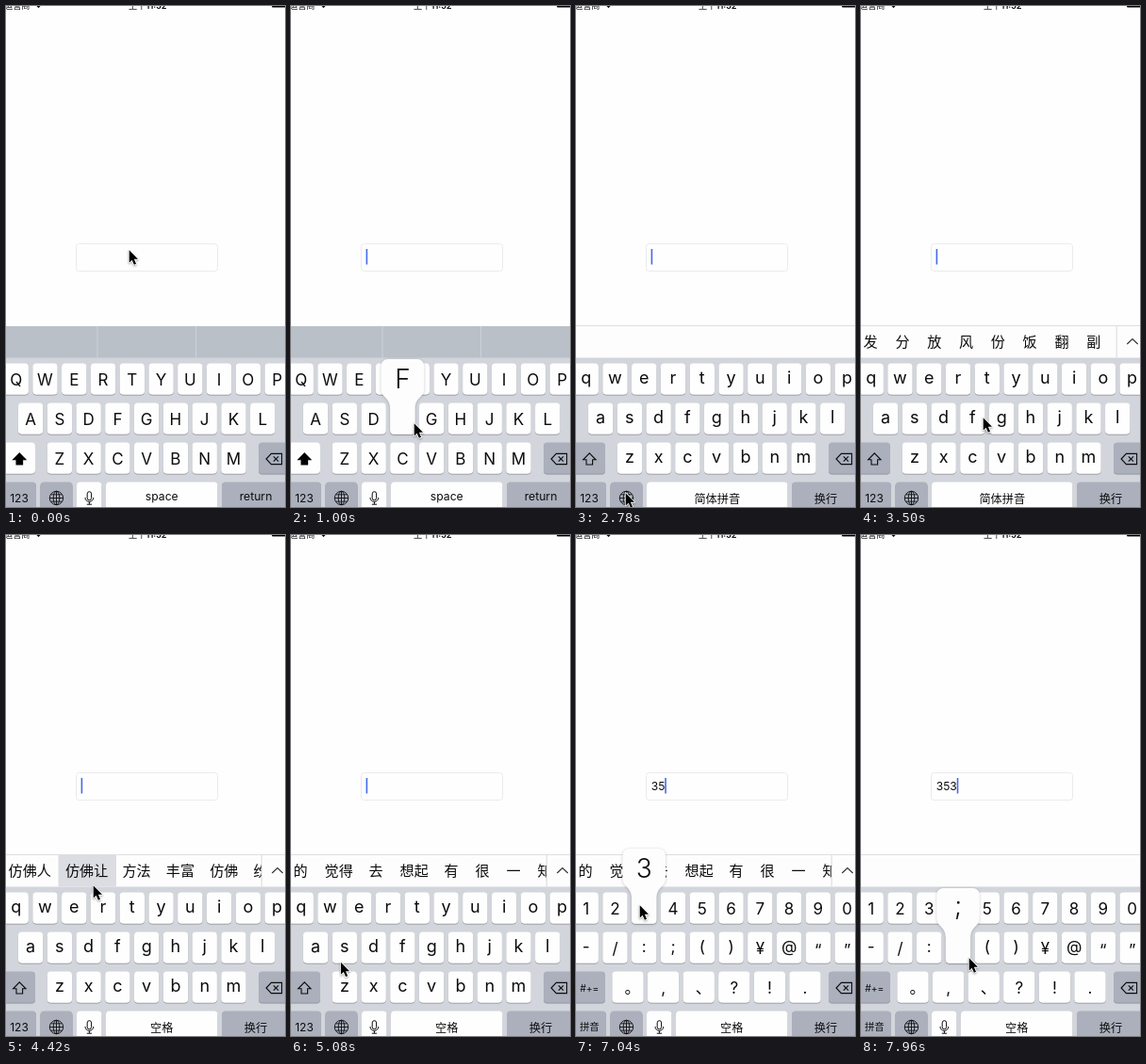
An HTML page with a canvas that plays this animation: 296x532 px, repeating every 7.99 s.

```html
<!DOCTYPE html>
<html lang="zh-CN">
<head>
<meta charset="utf-8">
<title>Keyboard input</title>
<style>
html, body { margin: 0; width: 100%; height: 100%; overflow: hidden; background: #fefefe; }
canvas { display: block; width: 296px; height: 532px; }
</style>
</head>
<body>
<canvas id="stage"></canvas>
<script>
const W = 296, H = 532, LOOP = 7990;
const LATIN = 'Inter, "Noto Sans CJK SC", "Noto Sans CJK", sans-serif';
const HAN = '"Noto Sans CJK SC", "Noto Sans CJK", sans-serif';
const INK = '#0c0c0e', GREY = '#abb0bc', WHITE = '#fefefe';
const PITCH = 30.77, KEY_W = 26.4, KEY_H = 33.4, FIRST = 10.7;
const BAR_TOP = 340, BAR_END = 373.4;
const rowTop = i => 379.4 + 42 * i;

// When the layouts change and how long a key stays down
const LOWER = 1090, PINYIN = 2700, NAMED = 3680, DIGITS = 5840, HOLD = 90;

const canvas = document.getElementById('stage');
const ctx = canvas.getContext('2d');
const dpr = window.devicePixelRatio || 1;
canvas.width = W * dpr;
canvas.height = H * dpr;

// Each row of keys: characters, indent in keys, pitch, key width
const row = (chars, indent, pitch = PITCH, w = KEY_W) => ({ chars: [...chars], x: FIRST + indent * PITCH, pitch, w });
const letters = [row('qwertyuiop', 0), row('asdfghjkl', 0.5), row('zxcvbnm', 1.5)];
const symbols = [row('1234567890', 0), row('-/:;()¥@“”', 0), row('。,、?!.', 1.44, 37.6, 33.4)];

const taps = [
  [1000, 'F'], [3340, 'f'], [3530, 'f'], [3740, 'r'], [6310, '3'],
  [6720, '5'], [7040, '3'], [7690, ';'], [7940, ';']
];

// Pointer moves: start, end, x, y
const moves = [
  [20, 330, 130, 443], [LOWER, 1200, 130, 400], [1370, 1900, 22, 399], [2040, 2520, 52, 517],
  [3140, 3340, 129, 437], [3610, 3740, 102, 406], [3990, 4210, 92, 372], [4770, 5330, 22, 515],
  [5850, 5950, 60, 426], [6190, 6290, 68, 396], [6410, 6550, 128, 396], [6790, 6890, 67, 393],
  [7400, 7450, 81, 452], [7590, 7680, 114, 449]
];

// Candidate bar: start, words, spacing
const next = '的 觉得 去 想起 有 很 一 知';
const bars = [
  [0, ''],
  [3430, '发 分 放 风 份 饭 翻 副', 19.8],
  [3600, '方法 丰富 仿佛 吩咐 非凡 纷', 18.4],
  [4000, '仿佛人 仿佛让 方法 丰富 仿佛 纷', 18.4],
  [4500, ''],
  [4780, next, 19],
  [7700, ''],
  [7760, next, 19],
  [7960, '']
];

// Every input restarts the blink
const resets = [-640, PINYIN, DIGITS, ...taps.map(p => p[0]), ...bars.slice(1).map(b => b[0])];

const latest = (list, t) => list.filter(e => e[0] <= t).pop();
const inside = (t, from, to) => t >= from && t < to;

function text(s, x, y, size, { weight = 400, font = LATIN, align = 'center', color = INK } = {}) {
  ctx.font = `${weight} ${size}px ${font}`;
  ctx.textAlign = align;
  ctx.fillStyle = color;
  ctx.fillText(s, x, y);
}

function box(x, y, w, h, color, r = 0) {
  ctx.beginPath();
  ctx.roundRect(x, y, w, h, r);
  ctx.fillStyle = color;
  ctx.fill();
}

function trace(points, close) {
  ctx.beginPath();
  points.forEach(([x, y]) => ctx.lineTo(x, y));
  if (close) ctx.closePath();
}

function stroke(color = INK, width = 1) {
  ctx.strokeStyle = color;
  ctx.lineWidth = width;
  ctx.stroke();
}

function line(points, color, width, close) {
  trace(points, close);
  stroke(color, width);
}

function key(x, y, w, color = WHITE) {
  box(x, y + 0.8, w, KEY_H, '#898c92', 4);
  box(x, y, w, KEY_H, color, 4);
}

// Symbols sit a little above the baseline, centred on the capitals
function label(c, x, y, size, weight) {
  const han = '。、'.includes(c);
  const lift = ':;@()-'.includes(c) ? 0.1 : '“”'.includes(c) ? -0.1 : 0;
  text(c, x + (han ? 5 : 0), y - lift * size, size, { weight, font: han ? HAN : LATIN });
}

function keyRow({ chars, x, pitch, w }, i, caps, digits) {
  const small = !caps && !digits;
  chars.forEach((c, n) => {
    const cx = x + n * pitch, y = rowTop(i);
    key(cx - w / 2, y, w);
    label(caps ? c.toUpperCase() : c, cx, y + (small ? 21.6 : 23.6), small ? 18 : 17);
  });
}

function shiftIcon(filled) {
  line([[14.3, 474.8], [21, 481.8], [17.6, 481.8], [17.6, 487], [11, 487], [11, 481.8], [7.6, 481.8]], INK, 1.1, true);
  if (filled) { ctx.fillStyle = '#000'; ctx.fill(); }
}

function deleteIcon() {
  const x = 286.4, y = 481, d = 2.6;
  line([[x - 10.3, y], [x - 5, y - 5.6], [x + 6.2, y - 5.6], [x + 6.2, y + 5.6], [x - 5, y + 5.6]], INK, 1.1, true);
  line([[x - d, y - d], [x + d, y + d]], INK, 1.1);
  line([[x + d, y - d], [x - d, y + d]], INK, 1.1);
}

function globeIcon() {
  const x = 53.5, y = 522.5, r = 7.2;
  for (const rx of [r, 3.3]) {
    ctx.beginPath();
    ctx.ellipse(x, y, rx, r, 0, 0, Math.PI * 2);
    stroke(INK, 0.9);
  }
  line([[x, y - r], [x, y + r]], INK, 0.9);
  line([[x - r, y], [x + r, y]], INK, 0.9);
  for (const d of [-3.7, 3.7]) line([[x - 6, y + d], [x + 6, y + d]], INK, 0.8);
}

function micIcon() {
  const x = 88.4, y = 522;
  ctx.beginPath();
  ctx.roundRect(x - 2.2, y - 6.3, 4.4, 9, 2.2);
  stroke();
  ctx.beginPath();
  ctx.arc(x, y, 4.4, 0, Math.PI);
  stroke();
  line([[x, y + 4.4], [x, y + 7]], INK, 1);
  line([[x - 2.6, y + 7.2], [x + 2.6, y + 7.2]], INK, 1);
}

function statusBar() {
  const left = { align: 'left', font: HAN };
  text('运营商', -2, 3, 9.2, left);
  trace([[34.5, 2.2], [32, -0.5], [37, -0.5]]);
  ctx.fill();
  text('上午', 130, 3, 9.2, left);
  text('11:52', 148.5, 3, 9.2, { align: 'left', weight: 600 });
  box(282, -4, 20, 5.5, '#000', 1);
}

function caretAlpha(t) {
  const phase = (t - Math.max(...resets.filter(r => r <= t))) % 800;
  return Math.max(0, 1 - Math.max(0, phase - 600) / 40, (phase - 770) / 30);
}

function field(t) {
  ctx.beginPath();
  ctx.roundRect(74.5, 252.5, 150, 29, 3);
  stroke('#ebebeb');
  // Only digits are accepted, on release
  const value = taps.filter(([at, c]) => at + HOLD <= t && c > '0' && c <= '9').map(p => p[1]).join('');
  text(value, 79.7, 271, 12.1, { align: 'left' });
  const x = 79.6 + ctx.measureText(value).width;
  ctx.globalAlpha = caretAlpha(t);
  box(x, 258, 1.6, 16.5, '#426bea');
  ctx.globalAlpha = 1;
}

function candidateBar(t) {
  const h = BAR_END - BAR_TOP;
  if (t < PINYIN) {
    box(0, BAR_TOP, W, h, '#b9c0c8');
    for (const x of [97, 201.5]) box(x - 0.5, BAR_TOP, 1, h, '#cdd2d8');
    if (t >= LOWER) text('“ ”', 45, 358, 12, { color: '#fff' });
    return;
  }
  box(0, BAR_TOP - 1, W, h + 1, '#fdfdfd');
  box(0, BAR_TOP - 1, W, 1, '#dedfe1');
  const [, words, gap] = latest(bars, t);
  if (!words) return;
  if (inside(t, 4420, 4500)) box(55.5, BAR_TOP, 61.5, h, '#dcdde2');
  ctx.save();
  ctx.beginPath();
  ctx.rect(0, BAR_TOP, 271, h);
  ctx.clip();
  let x = 2.6;
  for (const s of words.split(' ')) {
    text(s, x, 362, 15.1, { align: 'left', font: HAN });
    x += s.length * 14 + gap;
  }
  ctx.restore();
  box(270.7, BAR_TOP, 1, h, '#d8d9dc');
  line([[282.3, 359], [288, 353.6], [293.7, 359]], '#333', 1.1);
}

function keyboard(t) {
  const pinyin = t >= PINYIN, digits = t >= DIGITS, caps = t < LOWER;
  const naming = inside(t, PINYIN, NAMED);
  box(0, BAR_TOP, W, H - BAR_TOP, '#d2d5db');
  candidateBar(t);
  (digits ? symbols : letters).forEach((r, i) => keyRow(r, i, caps, digits));

  key(-8, rowTop(2), 39, caps ? WHITE : GREY);
  if (digits) text('#+=', 14.2, 484.5, 10.2);
  else shiftIcon(caps);
  key(268, rowTop(2), 40, GREY);
  deleteIcon();

  const y = rowTop(3), left = naming ? 75 : 106;
  key(-8, y, 40, GREY);
  if (digits) text('拼音', 14.3, 526, 10.4, { font: HAN });
  else text('123', 14, 526.5, 12);
  key(36.5, y, 34, GREY);
  globeIcon();
  if (!naming) {
    key(75, y, 26.5);
    micIcon();
  }
  key(left, y, 224.5 - left);
  key(229, y, 80, GREY);
  const [space, enter] = pinyin ? [naming ? '简体拼音' : '空格', '换行'] : ['space', 'return'];
  const base = pinyin ? 527.5 : 525;
  text(space, (left + 224.5) / 2, base, 12.2);
  text(enter, 265, base, 12.2);
}

function popup(c, digits) {
  const rows = digits ? symbols : letters;
  const i = rows.findIndex(r => r.chars.includes(c.toLowerCase()));
  const x = rows[i].x + rows[i].chars.indexOf(c.toLowerCase()) * rows[i].pitch;
  const y = rowTop(i), top = y - 46.5, half = 22.8, k = KEY_W / 2, foot = y + KEY_H;
  ctx.save();
  ctx.shadowColor = 'rgba(0,0,0,0.22)';
  ctx.shadowBlur = 3 * dpr;
  ctx.shadowOffsetY = 0.5 * dpr;
  ctx.beginPath();
  ctx.moveTo(x - half + 7, top);
  ctx.arcTo(x + half, top, x + half, top + 7, 7);
  ctx.lineTo(x + half, top + 32);
  ctx.bezierCurveTo(x + half, top + 41, x + k, top + 40, x + k, top + 53);
  ctx.arcTo(x + k, foot, x + k - 4, foot, 4);
  ctx.arcTo(x - k, foot, x - k, foot - 4, 4);
  ctx.lineTo(x - k, top + 53);
  ctx.bezierCurveTo(x - k, top + 40, x - half, top + 41, x - half, top + 32);
  ctx.arcTo(x - half, top, x - half + 7, top, 7);
  ctx.closePath();
  ctx.fillStyle = '#fdfdfd';
  ctx.fill();
  ctx.restore();
  label(c, x, top + 31.3, 28, 300);
}

function pointer(t) {
  let x = 130, y = 259;
  for (const [from, to, tx, ty] of moves) {
    const u = Math.min(1, Math.max(0, (t - from) / (to - from)));
    const s = (u + u * u * (3 - 2 * u)) / 2;
    x += (tx - x) * s;
    y += (ty - y) * s;
  }
  ctx.save();
  ctx.translate(x, y);
  trace([[0.7, 0.3], [0.7, 13.4], [3.7, 10.7], [5.9, 15.7], [8, 14.8], [5.9, 9.8], [10, 9.8]], true);
  ctx.lineJoin = 'round';
  ctx.shadowColor = 'rgba(0,0,0,0.35)';
  ctx.shadowBlur = 2 * dpr;
  ctx.shadowOffsetY = dpr;
  stroke('#fff', 1.8);
  ctx.shadowColor = 'transparent';
  ctx.fillStyle = '#000';
  ctx.fill();
  ctx.restore();
}

function draw(t) {
  ctx.setTransform(dpr, 0, 0, dpr, 0, 0);
  box(0, 0, W, H, '#fefefe');
  statusBar();
  field(t);
  keyboard(t);
  const tap = latest(taps, t);
  if (tap && t < tap[0] + HOLD) popup(tap[1], t >= DIGITS);
  pointer(t);
}

const start = performance.now();
function tick() {
  draw((performance.now() - start) % LOOP);
  requestAnimationFrame(tick);
}
tick();
</script>
</body>
</html>
```
